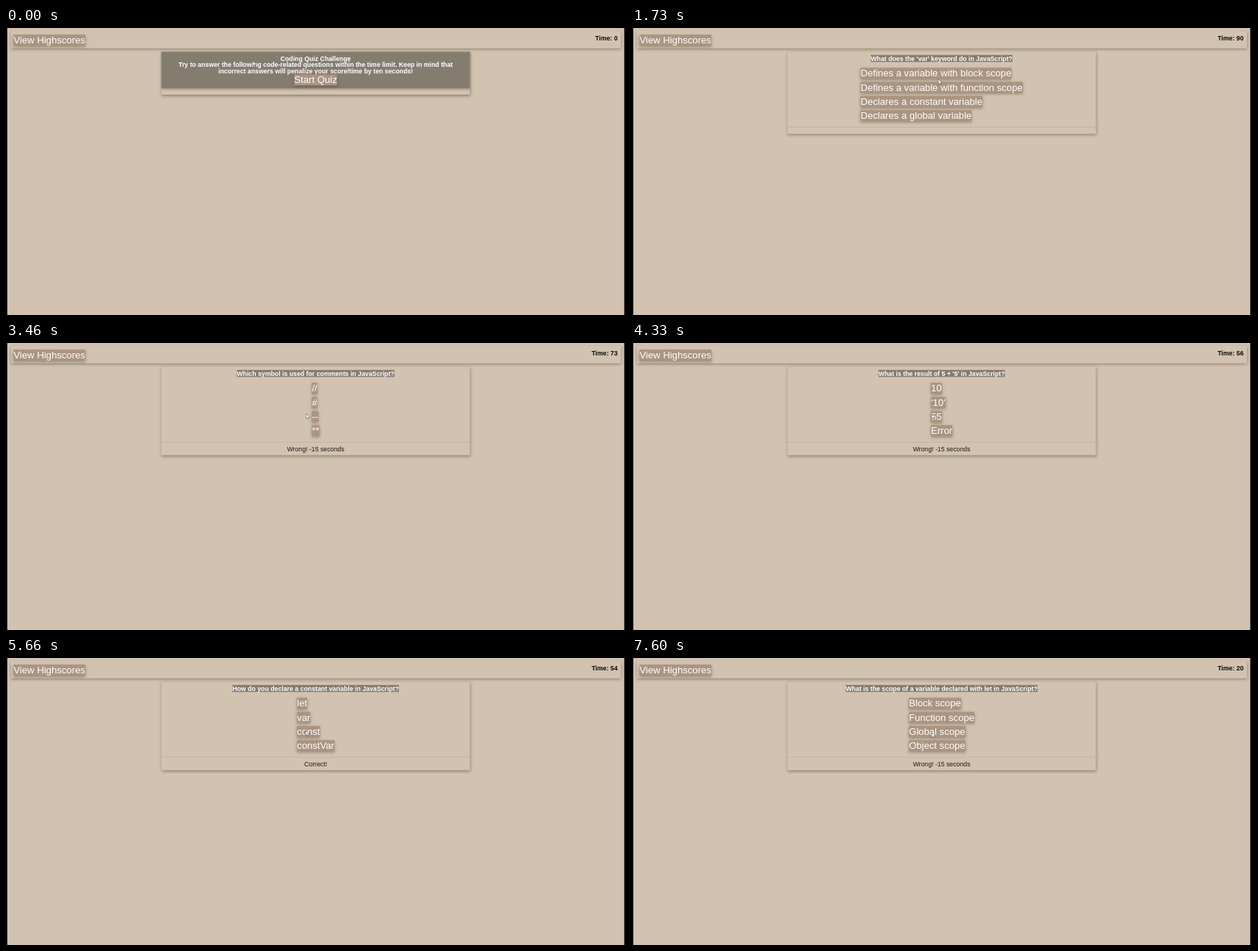
An HTML page with a canvas that plays this animation: 844 by 392 pixels, repeating every 8000 ms.

```html
<!DOCTYPE html>
<html lang="en">
<head>
<meta charset="utf-8">
<title>Coding Quiz</title>
<style>
  html, body { margin: 0; width: 100%; height: 100%; overflow: hidden; background: #d2c3b0; }
  canvas { display: block; }
</style>
</head>
<body>
<canvas id="stage" width="844" height="392"></canvas>
<script>
const ctx = document.getElementById('stage').getContext('2d');
const LOOP = 8000, START = 1730, TICK = 975, PENALTY = 16;
const MID = 421.5;
const BG = '#d2c3b0', BUTTON = '#ab9481', GREY = '#857c70';
const FAMILY = '"Liberation Sans", Arial, sans-serif';
const SMALL = '8.75px ' + FAMILY, BOLD = 'bold ' + SMALL, BIG = '13.15px ' + FAMILY;
const RIGHT = 'Correct!', WRONG = 'Wrong! -15 seconds';

const questions = [
  { at: START, note: '', title: "What does the 'var' keyword do in JavaScript?",
    answers: ['Defines a variable with block scope', 'Defines a variable with function scope',
      'Declares a constant variable', 'Declares a global variable'] },
  { at: 2600, note: RIGHT, title: 'Which of the following is not a data type in JavaScript?',
    answers: ['String', 'Integer', 'Object', 'Boolean'] },
  { at: 3460, note: WRONG, title: 'Which symbol is used for comments in JavaScript?',
    answers: ['//', '#', '--', '**'] },
  { at: 4330, note: WRONG, title: "What is the result of 5 + '5' in JavaScript?",
    answers: ['10', "'10'", '55', 'Error'] },
  { at: 4930, note: RIGHT, title: 'Which operator is used for strict equality in JavaScript?',
    answers: ['=', '==', '===', '!='] },
  { at: 5600, note: RIGHT, title: 'How do you declare a constant variable in JavaScript?',
    answers: ['let', 'var', 'const', 'constVar'] },
  { at: 6130, note: RIGHT, title: 'Which method is used to add an element to the end of an array in JavaScript?',
    answers: ['push()', 'append()', 'addToEnd()', 'concat()'] },
  { at: 6930, note: WRONG, title: 'Which method removes the last element from an array in JavaScript?',
    answers: ['pop()', 'shift()', 'slice()', 'remove()'] },
  { at: 7400, note: WRONG, title: 'What is the scope of a variable declared with let in JavaScript?',
    answers: ['Block scope', 'Function scope', 'Global scope', 'Object scope'] }
];

// Pointer path: time, x, y
const path = [
  [0, 336, 45], [60, 338, 45], [330, 408, 45], [530, 409, 66], [1130, 409, 66],
  [1330, 417, 70], [1730, 417, 70], [2200, 409, 79], [2460, 407, 85], [2600, 407, 85],
  [3200, 409, 96], [4130, 408, 98], [4330, 408, 97], [5130, 408, 97], [5460, 408, 99],
  [6130, 408, 99], [6530, 408, 79], [6930, 408, 79], [7130, 408, 102], [LOOP, 408, 102]
];

function pointerAt(t) {
  const i = path.findIndex(p => p[0] > t);
  const [t0, x0, y0] = path[i - 1], [t1, x1, y1] = path[i];
  const k = (t - t0) / (t1 - t0);
  return [x0 + (x1 - x0) * k, y0 + (y1 - y0) * k];
}

function text(str, x, y, font, color, align = 'left') {
  ctx.font = font;
  ctx.fillStyle = color;
  ctx.textAlign = align;
  ctx.fillText(str, x, y);
}

function width(str, font) {
  ctx.font = font;
  return ctx.measureText(str).width;
}

function raised(x, y, w, h, color, blur, alpha) {
  ctx.save();
  ctx.shadowColor = `rgba(60, 45, 35, ${alpha})`;
  ctx.shadowBlur = blur;
  ctx.shadowOffsetY = 1.5;
  ctx.fillStyle = color;
  ctx.fillRect(x, y, w, h);
  ctx.restore();
}

function button(label, x, y) {
  raised(x, y, width(label, BIG), 15.2, BUTTON, 4, 0.4);
  text(label, x, y + 11.9, BIG, '#fff');
}

function panel(bottom) {
  raised(211.5, 32.5, 420, bottom - 32.5, BG, 4, 0.45);
}

function drawIntro() {
  panel(91);
  raised(211.5, 32.5, 420, 49.8, GREY, 3, 0.35);
  ['Coding Quiz Challenge',
    'Try to answer the following code-related questions within the time limit. Keep in mind that',
    'incorrect answers will penalize your score/time by ten seconds!'
  ].forEach((line, i) => text(line, MID, 44.6 + i * 8.75, BOLD, '#fff', 'center'));
  button('Start Quiz', MID - width('Start Quiz', BIG) / 2, 63.2);
}

function drawQuestion({ title, answers, note }) {
  panel(note ? 153.3 : 144.6);
  ctx.fillStyle = '#c3b4a2';
  ctx.fillRect(211.5, 135, 420, 1);

  const w = width(title, BOLD);
  ctx.fillStyle = GREY;
  ctx.fillRect(MID - w / 2, 36.8, w, 9.6);
  text(title, MID, 44.6, BOLD, '#fff', 'center');

  const left = MID - Math.max(...answers.map(a => width(a, BIG))) / 2;
  answers.forEach((a, i) => button(a, left, 54.3 + i * 19.3));
  text(note, MID, 148, SMALL, '#1c1814', 'center');
}

function drawPointer(x, y) {
  ctx.beginPath();
  [[0, 0], [0, 6.6], [1.5, 5.3], [2.6, 7.6], [3.7, 7.1], [2.7, 4.9], [4.7, 4.8]]
    .forEach(([dx, dy]) => ctx.lineTo(x + dx, y + dy));
  ctx.closePath();
  ctx.fillStyle = '#fff';
  ctx.fill();
  ctx.strokeStyle = 'rgba(50, 45, 42, 0.75)';
  ctx.lineWidth = 0.6;
  ctx.stroke();
}

function timeLeft(t, asked) {
  if (t < START) return 0;
  const misses = asked.filter(q => q.note === WRONG).length;
  return 90 - Math.floor((t - START) / TICK) - misses * PENALTY;
}

function draw(t) {
  const asked = questions.filter(q => q.at <= t);
  ctx.fillStyle = BG;
  ctx.fillRect(0, 0, 844, 392);

  raised(6.5, 4, 830.5, 23.8, BG, 4, 0.45);
  button('View Highscores', 10.3, 9);
  text('Time: ' + timeLeft(t, asked), 832.5, 16.5, BOLD, '#0c0a08', 'right');

  if (asked.length) drawQuestion(asked[asked.length - 1]);
  else drawIntro();
  drawPointer(...pointerAt(t));

  ctx.fillStyle = '#000';
  ctx.fillRect(0, 0, 1.7, 392);
  ctx.fillRect(841.6, 0, 2.4, 392);
}

function frame() {
  draw(performance.now() % LOOP);
  requestAnimationFrame(frame);
}
frame();
</script>
</body>
</html>
```
